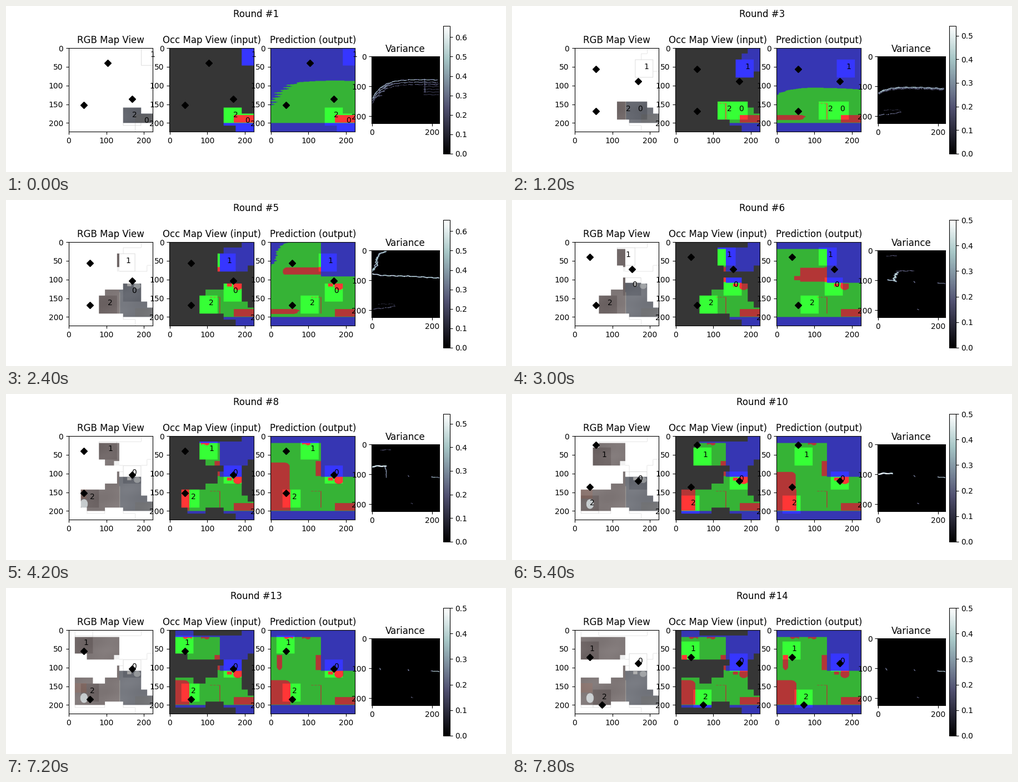
These frames come from a looping animation (900 px wide and 300 px high, 8000 ms). A matplotlib script:

```python
import numpy as np
import matplotlib.pyplot as plt
from matplotlib.animation import FuncAnimation

N = 224           # map side
CELL = 16         # agents and goals sit at cell centres
HALF = 24         # half of an agent's view
STEP_MS, ROUND_STEPS, STEPS = 200, 3, 40
LAST = 14
Y, X = np.mgrid[0:N, 0:N]

DIM = np.array([(54, 54, 179), (54, 179, 54), (179, 54, 54)], np.uint8)
LIT = np.array([(54, 54, 255), (54, 255, 54), (255, 54, 54)], np.uint8)
UNSEEN = (54, 54, 54)
OUT, FREE, BLOCK = 0, 1, 2
PEAKS = {1: .658, 2: .658, 3: .541, 5: .658, 8: .541}


def route(*keys):
    """Positions per round from (round, column, row) key points."""
    at, col, row = np.array(keys).T
    rounds = np.arange(1, LAST + 1)
    cells = np.column_stack([np.interp(rounds, at, col), np.interp(rounds, at, row)])
    return np.round(cells).astype(int) * CELL + CELL // 2


AGENTS = [
    route((1, 12, 12), (3, 10, 10), (5, 10, 8), (6, 9, 7), (7, 10, 6),
          (8, 10, 6), (9, 10, 7), (12, 10, 7), (14, 10, 5)),
    route((1, 13, 1), (3, 11, 3), (4, 10, 2), (5, 9, 3), (6, 8, 2), (7, 7, 3),
          (8, 6, 2), (10, 4, 3), (11, 3, 2), (12, 2, 1), (14, 2, 3)),
    route((1, 10, 11), (2, 9, 10), (3, 8, 10), (4, 7, 9), (5, 6, 10), (6, 5, 10),
          (7, 4, 11), (8, 3, 10), (9, 2, 10), (10, 2, 11), (12, 2, 9), (14, 4, 11)),
]
GOALS = [
    route((1, 10, 8), (3, 10, 5), (5, 10, 6), (6, 9, 4), (8, 10, 6), (11, 10, 8), (14, 10, 5)),
    route((1, 6, 2), (3, 3, 3), (5, 3, 3), (6, 2, 2), (8, 2, 2), (11, 3, 1), (14, 2, 4)),
    route((1, 2, 9), (3, 3, 10), (6, 3, 10), (8, 2, 9), (11, 2, 8), (14, 4, 12)),
]


def box(x0, x1, y0, y1):
    return (X >= x0) & (X < x1) & (Y >= y0) & (Y < y1)


def oval(cx, cy, rx, ry):
    return ((X - cx) / rx) ** 2 + ((Y - cy) / ry) ** 2 <= 1


def round_top(x1, y0, y1):
    """Block on the left border with a rounded upper right corner."""
    corner = box(x1 - 12, N, 0, y0 + 12) & ~oval(x1 - 12, y0 + 12, 12, 12)
    return box(0, x1, y0, y1) & ~corner


COUCH = box(171, N, 180, 200)
WALL = box(120, 134, 68, 108)
ROOMS = np.where(box(0, 134, 20, 201) | box(0, N, 110, 201), FREE, OUT)


def make_truth():
    ripple = 2 * np.sin(X / 3)
    blocks = [
        COUCH,
        WALL,
        (oval(181, 118, 12, 11) | box(171, 193, 110, 120)) & (Y >= 110),
        box(153, 166, 112, 120),
        box(133, 135, 148, 200),
        box(107, 133, 148, 149) & (X % 9 < 6),
        box(84, 106, 20, 26) & (Y < 24 + ripple),
        box(36, 60, 20, 25) & (Y < 23 + ripple),
        box(17, 31, 68, 108) & (Y < 104 + 2 * ripple),
        round_top(53, 135, 200),
    ]
    return np.where(np.any(blocks, axis=0), BLOCK, ROOMS)


def make_photo():
    """Top view of the floor in muted tones."""
    img = np.full((N, N, 3), 255.0)
    inside = ROOMS == FREE
    patches = [
        (inside, (111, 102, 102)),
        (inside & (X >= 134), (98, 101, 109)),
        (box(176, N, 178, 200), (97, 98, 101)),
        (box(134, 136, 135, 201), (138, 134, 130)),
        (box(155, 166, 111, 119), (165, 165, 165)),
        (oval(181, 118, 9, 8), (148, 151, 154)),
        (box(16, 47, 143, 168), (122, 98, 92)),
        (oval(40, 182, 10, 13), (195, 200, 202)),
    ]
    for mask, tone in patches:
        img[mask] = tone
    img[inside] += (4 * np.sin(X / 17 + Y / 29) + 2 * np.sin(Y / 7))[inside][:, None]
    img[WALL & (Y < 82)] = 240
    return img.clip(0, 255)


TRUTH = make_truth()
PHOTO = make_photo()


def view(pos):
    x, y = pos
    return box(x - HALF, x + HALF, y - HALF, y + HALF)


def border(mask):
    p = np.pad(mask, 1, mode="edge")
    return mask & ~(p[:-2, 1:-1] & p[2:, 1:-1] & p[1:-1, :-2] & p[1:-1, 2:])


def floor_top(r, x):
    """Predicted upper edge of the floor in the early rounds."""
    x = np.maximum(x, 0)
    return min(77 + 9 * r, 104) + 68 / r * np.exp(-x / 34) + 2.5 * r * (x / N) ** 2


def left_edge(y):
    """Predicted left edge of the upper room in round 5."""
    return 13 + 42 * np.exp(-y / 11) - 13 * np.clip((y - 50) / 16, 0, 1)


def bed_top(r):
    return max(72, 72 + 12.3 * (r - 8))


def guess(r):
    """Predicted layout of the parts nobody has seen yet."""
    if r >= 13:
        return TRUTH
    wave = np.sin(Y * 0.9) + 0.6 * np.sin(Y * 0.37 + X * 0.05)
    g = ROOMS.copy()
    if r <= 4:
        g[:] = np.where((Y > floor_top(r, X + 9 / r * wave)) & (Y < 201), FREE, OUT)
    if r == 5:
        g[box(0, 134, 3, 60) | box(134, N, 93, 115)] = FREE
        g[(X < left_edge(Y) + 2.5 * wave) & (Y < 68)] = OUT
        g[(box(40, 134, 69, 90) | oval(42, 79.5, 10, 10)) & (Y < 88 + wave)] = BLOCK
    if 3 <= r <= 5:
        tip = 75 - ((Y - 185) / 8.0) ** 2 * 14
        g[box(0, 80, 180, 193) & (X < tip + 2 * wave)] = BLOCK
    if r == 6:
        g[box(63, 134, 70, 107) | box(47, 63, 92, 103)] = BLOCK
    if r >= 7:
        g[WALL | round_top(51, bed_top(r), 200)] = BLOCK
    if r >= 6:
        g[COUCH] = BLOCK
    return g


def variance(r):
    img = np.zeros((N, N))
    rng = np.random.default_rng(r)
    peak = PEAKS.get(r, .5)

    def line(points, value, width=2, gaps=0.2):
        px, py = np.array(points, float).T
        at = np.r_[0, np.cumsum(np.hypot(np.diff(px), np.diff(py)))]
        for d in np.arange(0, at[-1], 0.7):
            if rng.random() < gaps:
                continue
            x = max(int(np.interp(d, at, px) + rng.normal(0, 0.4)), 0)
            y = int(np.interp(d, at, py) + 0.8 * np.sin(d / 4))
            spot = img[y:y + width, x:x + width]
            np.maximum(spot, value * rng.uniform(0.6, 1), out=spot)

    xs = np.arange(2, N, 12)
    if r <= 4:
        edge = floor_top(r, xs)
        for i in range(3):
            line(np.c_[xs, edge + (8 * i - 9) / r], peak * (0.9 - 0.2 * i), 2, 0.1 + 0.2 * i)
    if r <= 2:
        for i in range(5):
            line([(172, 92 + 9 * i), (222, 93 + 9 * i)], 0.2)
            x, y = 4 + 9 * i, floor_top(r, 4 + 9 * i) - 8
            line([(x, y), (x + 30, y - 8)], 0.4)
        line([(175, 76), (176, 122)], 0.35, 2, 0.3)
    if 3 <= r <= 5:
        line([(2, 196), (50, 192), (78, 186)], 0.35, 2, 0.5)
        line([(20, 180), (74, 180), (78, 188)], 0.35, 1, 0.4)
    if r == 5:
        ys = np.arange(4, 76, 4)
        for shift in (0, 4):
            line(np.c_[left_edge(ys) + shift + rng.normal(0, 2, len(ys)), ys], 0.5, 3)
        line([(0, 78), (30, 84), (130, 87), (224, 93)], 0.6, 3, 0.1)
    if r == 6:
        for y in range(74, 104, 2):
            x = 62 - 0.5 * (y - 74) + rng.normal(0, 2)
            line([(x, y), (x + rng.uniform(3, 10), y)], 0.45, 2, 0)
        line([(32, 98), (62, 104)], 0.4, 3)
        line([(62, 70), (120, 69)], 0.3, 2, 0.4)
    if 7 <= r <= 11:
        y = bed_top(r)
        line([(0, y + 3), (16, y), (48, y + 1)], peak, 4, 0)
        if r <= 8:
            line([(44, y + 3), (48, y + 16), (48, y + 40)], 0.4)
    if 6 <= r <= 9:
        line([(30, 20), (64, 19)], 0.25, 2, 0.5)
    if r >= 6:
        line([(198, 109), (224, 112)], 0.5 if r > 7 else 0.3, 2, 0.1)
        line([(120, 104), (123, 108)], 0.35)
        line([(131, 196), (136, 198)], 0.3)
    if r >= 12:
        line([(27, 100), (30, 106)], 0.35)
    return img


def paint(cells, lit):
    return np.where(lit[..., None], LIT[cells], DIM[cells])


def make_round(r):
    seen = np.any([view(p) for path in AGENTS for p in path[:r]], axis=0)
    views = [view(path[r - 1]) for path in AGENTS]
    lit = np.any(views, axis=0)

    rgb = np.full((N, N, 3), 255.0)
    rgb[seen] = PHOTO[seen] * 0.88 + 255 * 0.12
    rgb[lit] = PHOTO[lit]
    rgb[border(seen) & (TRUTH == OUT)] = 218
    for v in views:
        rgb[border(v) & (TRUTH == OUT)] = 205

    occ = paint(TRUTH, lit)
    occ[~seen] = UNSEEN
    pred = paint(np.where(seen, TRUTH, guess(r)), lit)
    return rgb.astype(np.uint8), occ, pred, variance(r)


ROUNDS = [make_round(r) for r in range(1, LAST + 1)]

fig, axes = plt.subplots(1, 4, figsize=(9, 3), dpi=100)
head = fig.suptitle("Round #1")
names = ["RGB Map View", "Occ Map View (input)", "Prediction (output)", "Variance"]
images, dots, labels = [], [], []
for i, (ax, name) in enumerate(zip(axes, names)):
    ax.set_title(name)
    images.append(ax.imshow(ROUNDS[0][i], cmap="bone"))
    if i < 3:
        dots.append(ax.plot([], [], "kD", scalex=False, scaley=False)[0])
        labels.append([ax.text(0, 0, str(k)) for k in range(3)])
images[3].set_clim(0, PEAKS[1])
fig.colorbar(images[3], ax=axes[3])


def update(step):
    k = step // ROUND_STEPS
    head.set_text(f"Round #{k + 1}")
    for image, data in zip(images, ROUNDS[k]):
        image.set_data(data)
    images[3].set_clim(0, PEAKS.get(k + 1, .5))
    for dot, texts in zip(dots, labels):
        dot.set_data(*zip(*(goal[k] for goal in GOALS)))
        for text, path in zip(texts, AGENTS):
            text.set_position(path[k])
    return []


anim = FuncAnimation(fig, update, frames=STEPS, interval=STEP_MS,
                     repeat=True, repeat_delay=0, blit=False)
plt.show()
```
